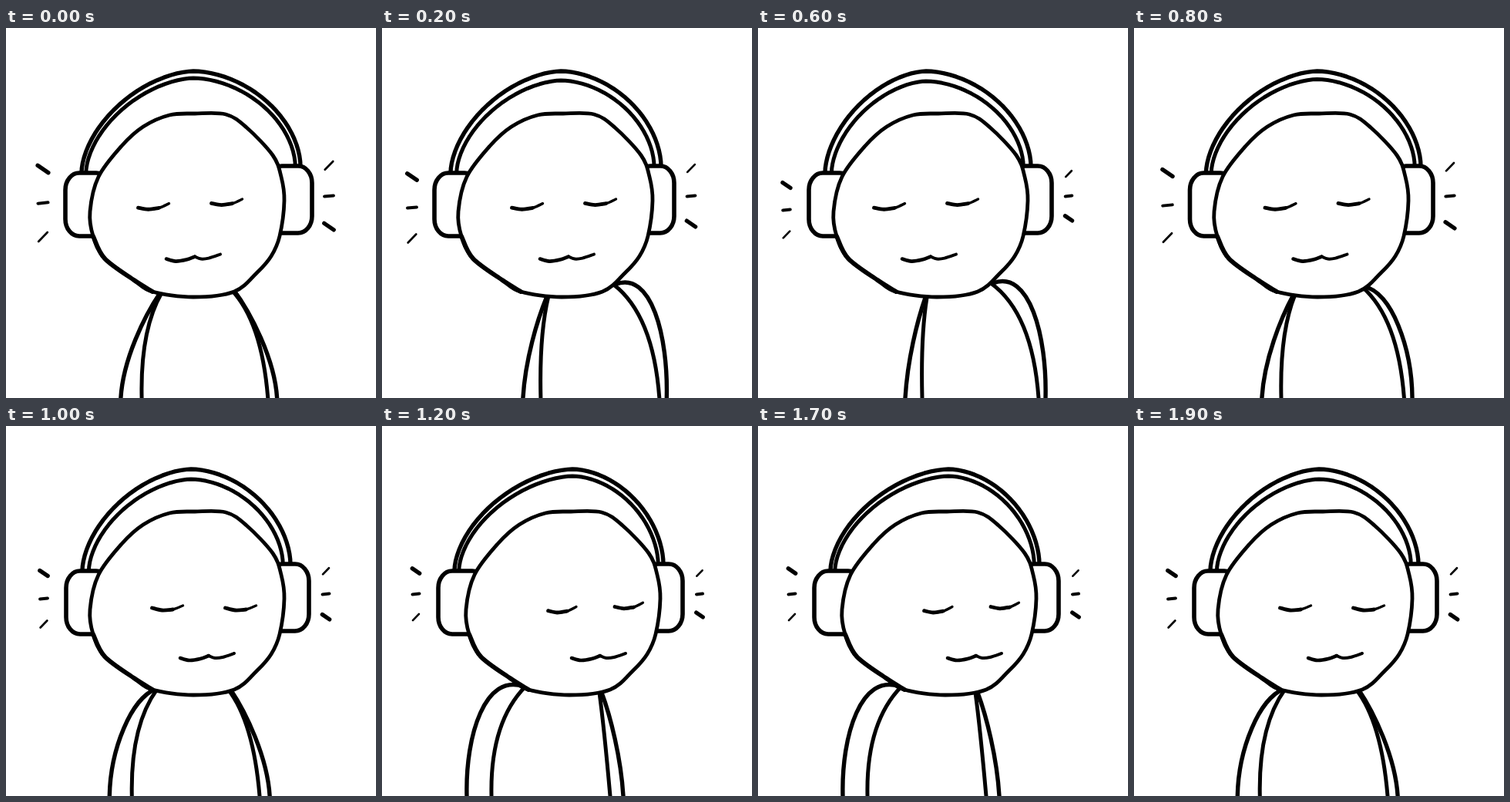
Write an HTML page with a canvas that moves like this. It is 480 by 480 pixels and loops after 2 s.

```html
<!DOCTYPE html>
<html lang="en">
<head>
<meta charset="utf-8">
<title>Listening to music</title>
<style>
html, body { margin: 0; width: 100%; height: 100%; overflow: hidden; background: #fff; }
canvas { display: block; width: 100vw; height: 100vh; }
</style>
</head>
<body>
<canvas width="480" height="480"></canvas>
<script>
const ctx = document.querySelector('canvas').getContext('2d');
ctx.lineCap = ctx.lineJoin = 'round';
ctx.fillStyle = '#fff';

const HEAD = [[245, 111], [285, 112], [312, 129], [346, 165], [357, 193], [361, 224], [355, 270],
  [344, 296], [326, 317], [296, 342], [243, 349], [190, 342], [166, 327], [128, 299], [113, 270],
  [109, 238], [120, 193], [150, 153], [178, 128], [212, 113]];

// The sway runs from 0 (right) to 8 (left). Each key gives: sway, face turn, head x,
// outer edge of both ear cups, band top x, band right foot x, band gap, ray spread, body lean.
const KEYS = [
  [0, 28, 5, 87, 399, 236, 382, 12, 35, 0],
  [2, 20, 0, 73, 390, 247, 365, 9, 30, 0],
  [4, 0, 0, 78, 393, 240, 369, 13, 33, .3],
  [5, -18, 0, 77, 397, 243, 382, 9, 44, .48],
  [7, -21, -10, 68, 379, 232, 362, 12, 40, .9],
  [8, -39, -11, 66, 381, 218, 354, 13, 32, 1]
];

const clamp = v => Math.max(0, Math.min(1, v));

function poseAt(sway) {
  const next = Math.max(1, KEYS.findIndex(k => k[0] >= sway));
  const i = sway > 8 ? KEYS.length - 1 : next;
  const [a, b] = [KEYS[i - 1], KEYS[i]];
  const t = (sway - a[0]) / (b[0] - a[0]);
  return a.map((v, j) => v + (b[j] - v) * t);
}

function stroke(width, path) {
  ctx.beginPath();
  path();
  ctx.lineWidth = width;
  ctx.stroke();
}

// Catmull-Rom curve through the points.
function curve(pts, closed) {
  const n = pts.length;
  const at = i => pts[closed ? (i + n) % n : Math.max(0, Math.min(n - 1, i))];
  ctx.moveTo(...pts[0]);
  for (let i = 0; i < (closed ? n : n - 1); i++) {
    const [a, b, c, d] = [at(i - 1), at(i), at(i + 1), at(i + 2)];
    ctx.bezierCurveTo(
      b[0] + (c[0] - a[0]) / 6, b[1] + (c[1] - a[1]) / 6,
      c[0] - (d[0] - b[0]) / 6, c[1] - (d[1] - b[1]) / 6, ...c);
  }
}

function body(lean) {
  const top = 186 + 33 * lean, left = 142 + 71 * lean;
  const topY = 338 + 12 * lean;
  const topR = 282 + 20 * lean, topRY = 346 - 15 * lean;
  const swing = Math.max(0, lean) ** .6;
  const right = 296 + 68 * swing;

  stroke(5, () => {
    ctx.moveTo(top, topY);
    ctx.quadraticCurveTo(left - 2, 385 + 15 * lean, left, 480);
    ctx.moveTo(topR, topRY);
    ctx.quadraticCurveTo(right - 8, 390 - 20 * lean, right, 480);
  });
  // The shoulder rises on the side the body leans away from.
  const arm = (x, y, end, lift, side) => stroke(5.4, () => {
    ctx.moveTo(x, y);
    ctx.bezierCurveTo(x + .4 * (end - x) + side * 20 * lift, y + 30 - 48 * lift,
      end + side * (5 * lift - 3), 430 - 30 * lift, end, 480);
  });
  arm(top - 2, topY, left - 32 + 10 * lean, clamp(1 - lean / .48), -1);
  arm(topR + 3, topRY, 313 + 60 * swing, clamp((lean - .48) / .42), 1);
}

// Arch made of two quarter superellipses that meet at the top.
function arch(x1, y1, topX, topY, x2, y2) {
  const steps = 24;
  for (let i = 0; i <= 2 * steps; i++) {
    const a = i / steps * Math.PI / 2;
    const first = i <= steps;
    const power = 2 / (first ? 1.7 : 1.82);
    const [x, y] = first ? [x1, y1] : [x2, y2];
    ctx.lineTo(topX + (x - topX) * Math.abs(Math.cos(a)) ** power,
      y + (topY - y) * Math.abs(Math.sin(a)) ** power);
  }
}

function cup(x, y, w, h) {
  stroke(5.6, () => {
    ctx.roundRect(x, y, w, h, { x: 18, y: 22 });
    ctx.fill();
  });
}

function head(x) {
  ctx.save();
  ctx.translate(x, 0);
  stroke(4.8, () => {
    curve(HEAD, true);
    ctx.fill();
  });
  stroke(5.8, () => curve(HEAD.slice(11, 15)));
  ctx.restore();
}

function face(turn) {
  const tilt = clamp(Math.abs(turn) / 18);
  const rise = 7 * clamp(-turn / 18);
  const squeeze = 1 - .0045 * Math.max(0, turn);
  for (const x of [-47.5, 47.5]) {
    const eye = [[-20, 0], [-7, 3], [7, 2], [20, -3]].map(([dx, dy]) => {
      const off = (x + dx) * squeeze;
      return [257 + turn + off, 236 + dy - rise - .06 * tilt * off];
    });
    stroke(3.4, () => curve(eye));
    stroke(4.8, () => curve(eye.slice(0, 3)));
  }
  const lip = pts => curve(pts.map(([x, y]) => [261 + turn + x, 300 + y - rise * .2]));
  stroke(4.6, () => lip([[-35, 1], [-23, 4], [-9, 2], [2, -2]]));
  stroke(4, () => lip([[2, -2], [10, 1], [20, 0], [35, -5]]));
}

// Three short rays fanning out beside an ear cup.
function rays(x, y, spread, side) {
  for (const k of [-1, 0, 1]) {
    const angle = side * k * .7 - .1;
    const len = spread * (k ? .19 : .15);
    const [dx, dy] = [len * Math.cos(angle), len * Math.sin(angle)];
    stroke(4 + side * k * 1.3, () => {
      ctx.moveTo(x - dx, y + k * spread - dy);
      ctx.lineTo(x + dx, y + k * spread + dy);
    });
  }
}

function draw(pose) {
  const [sway, turn, headX, cupL, cupR, topX, foot, gap, spread, lean] = pose;
  ctx.fillRect(0, 0, 480, 480);
  body(lean);
  stroke(5.4, () => arch(cupL + 21, 187, topX, 56, foot, 179));
  stroke(5, () => arch(cupL + 21 + .65 * gap, 187, topX, 56 + gap, foot - .75 * gap, 179));
  cup(cupL, 188, 135 + headX - cupL, 82);
  cup(340 + headX, 179, cupR - 340 - headX, 87);
  head(headX);
  face(turn);
  rays(cupL - 29, 212 + 3 * sway, spread, -1);
  rays(cupR + 22, 218, spread * .9, 1);
}

// Swing back and forth, 100 ms per pose, both ends held twice as long.
function tick() {
  const step = (Math.floor(performance.now() / 100) + 5) % 20;
  draw(poseAt(Math.min(8.3, step < 10 ? step : 19 - step)));
  requestAnimationFrame(tick);
}
tick();
</script>
</body>
</html>
```
